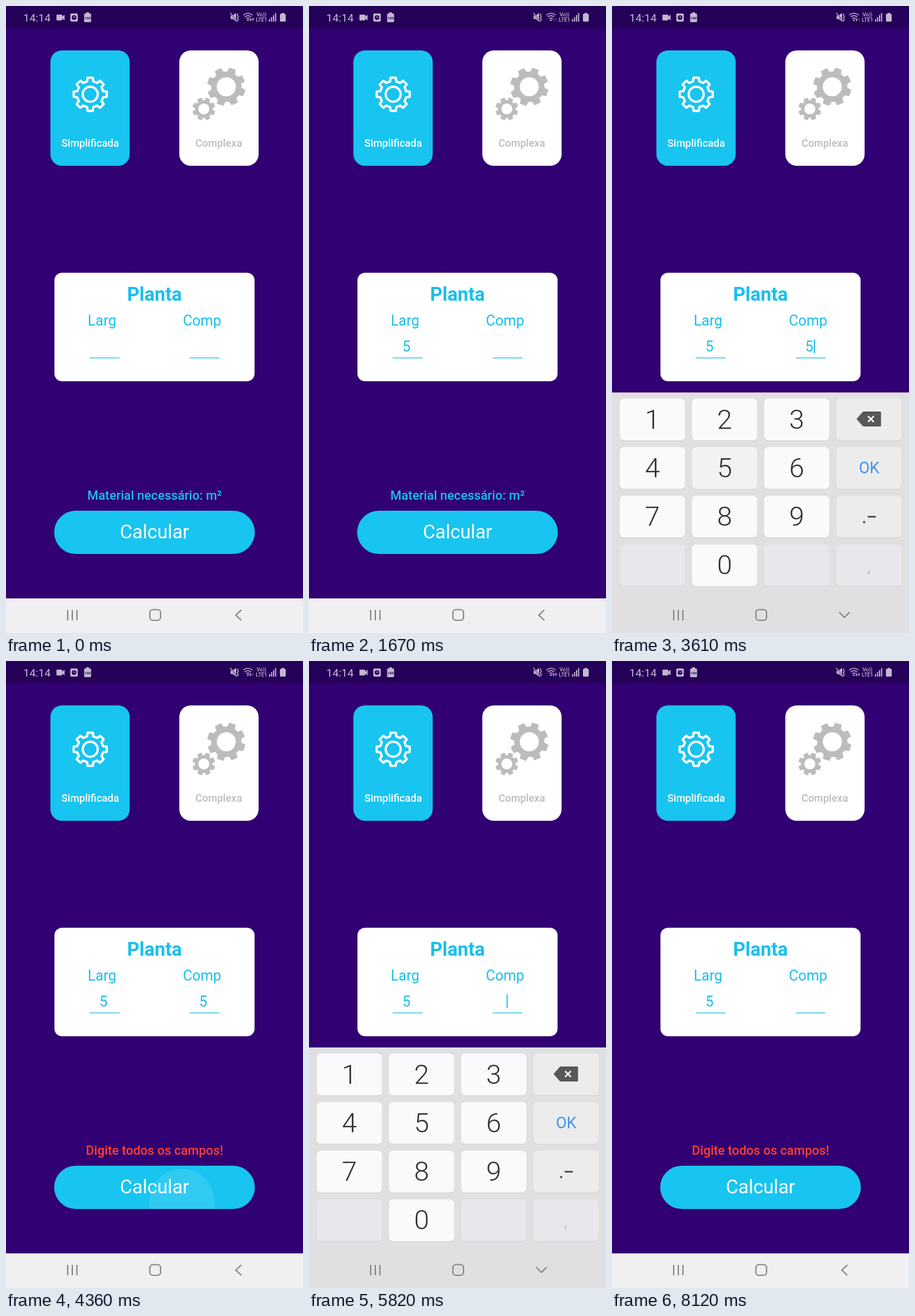
Animation, 515 px wide and 1087 px high, one loop 8180 ms. Source, as an HTML page:

```html
<!DOCTYPE html>
<html lang="pt">
<head>
<meta charset="utf-8">
<style>
  html, body { margin: 0; width: 100%; height: 100%; overflow: hidden; background: #310072; }
  svg { display: block; width: 515px; height: 1087px; font-family: Roboto, sans-serif; }
  .mid { text-anchor: middle; }
  .cyan { fill: #1abfec; }
</style>
</head>
<body>
<svg id="stage" viewBox="0 0 515 1087" xmlns="http://www.w3.org/2000/svg"></svg>
<script>
const LOOP = 8180;
const HIDE_MS = 200, SHOW_MS = 220, SLIDE = 161;

// keyboard sessions: focused field, start of show, start of hide
const sessions = [
  { field: 0, show: 420, hide: 1400 },
  { field: 1, show: 2880, hide: 3860 },
  { field: 1, show: 5240, hide: 7040 }
];
// column, row, time of key press
const presses = [
  [1, 1, 960], [3, 1, 1200],
  [1, 1, 3460], [3, 1, 3680],
  [3, 0, 5600], [3, 1, 6700]
];
// x, y, start of touch on the button
const taps = [[290, 920, 1960], [305, 937, 4290], [300, 925, 7640]];
const values = [
  [[0, ''], [1000, '5']],
  [[0, ''], [3500, '5'], [5640, '']]
];
const need = n => `Material necessário: ${n}m²`;
const warn = 'Digite todos os campos!';
const messages = [[0, need('')], [2060, warn], [4440, need('25')], [7760, warn]];
const arrows = [[0, 1, 1], [1300, 0, 0], [3600, 1, 0], [4700, 1, 1]];

const text = (x, y, size, str, attrs = '') =>
  `<text x="${x}" y="${y}" font-size="${size}" ${attrs}>${str}</text>`;
const rect = (x, y, w, h, rx, fill, attrs = '') =>
  `<rect x="${x}" y="${y}" width="${w}" height="${h}" rx="${rx}" fill="${fill}" ${attrs}/>`;

function gear(cx, cy, tip, root, turn) {
  const pts = [];
  for (let i = 0; i < 8; i++) {
    for (const [r, a] of [[root, -13.5], [tip, -9], [tip, 9], [root, 13.5]]) {
      const rad = (i * 45 + a + turn) * Math.PI / 180;
      pts.push((cx + r * Math.sin(rad)).toFixed(2) + ' ' + (cy - r * Math.cos(rad)).toFixed(2));
    }
  }
  return 'M' + pts.join('L') + 'Z';
}
const hole = (cx, cy, r) =>
  `M${cx - r} ${cy}a${r} ${r} 0 1 0 ${2 * r} 0a${r} ${r} 0 1 0 ${-2 * r} 0Z`;

const statusBar = () => rect(0, 0, 515, 39, 0, '#250058') +
  `<g fill="#c3b8d0">
    ${text(30, 26.5, 19, '14:14')}
    <path d="M88.500 15h8q1 0 1 1v2.500l4-3.500v10l-4-3.500v2.500q0 1-1 1h-8q-1 0-1-1v-8q0-1 1-1z"/>
    ${rect(111.500, 13, 13, 14, 2, '#c3b8d0')}
    <circle cx="118" cy="20" r="4" fill="#250058"/>
    <path d="M118 17.500V20H120" fill="none" stroke="#c3b8d0" stroke-width="1.200"/>
    <path d="M139 13v-2h5v2h2q1.500 0 1.500 1.500v12q0 1.500-1.500 1.500h-9q-1.500 0-1.500-1.500v-12q0-1.500 1.500-1.500z"/>
    ${text(141.500, 23, 6, '100', 'class="mid" font-weight="700" fill="#250058"')}
    <path d="M389.500 16.500h3.500l6-4.500v15l-6-4.500h-3.500z"/>
    <path d="M389 12l12 15" stroke="#250058" stroke-width="2.500"/>
    <path d="M389 12l12 15M402.500 13l-1.500 2.500 2 2.500-2 3 2 2.500-1.500 2.500" fill="none" stroke="#c3b8d0" stroke-width="1.400"/>
    <g fill="none" stroke="#c3b8d0" stroke-width="1.600">
      <path d="M411.500 16q8-7 16 0M414 19q5.500-4.500 11 0M416.500 22q3-2.500 6 0"/>
    </g>
    <circle cx="419.500" cy="24.500" r="1.500"/>
    <path id="down" d="M422 23.500h1.600v-3h1v3h1.600l-2.100 3z"/>
    <path id="up" d="M426 23.500h1.600v3h1v-3h1.600l-2.100-3z"/>
    ${text(443, 18, 9, 'Vo))', 'class="mid" font-weight="500"')}
    ${text(443, 27, 9, 'LTE1', 'class="mid" font-weight="500"')}
    ${[0, 1, 2, 3].map(i => rect(456 + i * 3.500, 23 - i * 3.600, 2, 4 + i * 3.600, 0, '#c3b8d0')).join('')}
    <path d="M478 13.500v-1.500h4v1.500h1.500q1.500 0 1.500 1.500v10.500q0 1.500-1.500 1.500h-7q-1.500 0-1.500-1.500V15q0-1.500 1.500-1.500z"/>
  </g>`;

const modeCards = () =>
  rect(77, 77, 137.5, 200, 20, '#18c4f0') +
  `<g fill="none" stroke="#fff" stroke-width="4" stroke-linejoin="round">
    <path d="${gear(146, 153, 29, 23, 0)}"/><circle cx="146" cy="153" r="13"/>
  </g>` +
  text(146, 244, 18, 'Simplificada', 'class="mid" font-weight="500" fill="#fff"') +
  rect(300.5, 77, 137.5, 200, 20, '#fff') +
  `<path fill="#bcbcbf" fill-rule="evenodd" stroke="#bcbcbf" stroke-width="2" stroke-linejoin="round"
    d="${gear(382, 140, 32.5, 25.5, 19) + hole(382, 140, 17.5)}${gear(343, 178.5, 19, 14.5, 22) + hole(343, 178.5, 10.5)}"/>` +
  text(369, 244, 18, 'Complexa', 'class="mid" font-weight="500" fill="#bcbcbf"');

const planCard = () =>
  rect(84, 462.5, 347, 188, 13, '#fff') +
  `<g class="mid cyan">
    ${text(257.5, 511, 33, 'Planta', 'font-weight="700"')}
    ${text(166.5, 554, 25, 'Larg') + text(340, 554, 25, 'Comp')}
    ${text(169, 599, 25, '', 'id="val0"') + text(342, 599, 25, '', 'id="val1"')}
    ${rect(145, 609.5, 52, 1.3, 0, '#1abfec') + rect(318.5, 609.5, 51.5, 1.3, 0, '#1abfec')}
    ${rect(0, 578, 2, 24, 0, '#1abfec', 'id="caret"')}
  </g>`;

const button = () =>
  text(257.5, 856, 22, '', 'id="msg" class="mid" font-weight="500"') +
  `<clipPath id="pill">${rect(83.5, 875, 348, 75, 37.5, '#000')}</clipPath>` +
  rect(83.5, 875, 348, 75, 37.5, '#18c4f0') +
  '<circle id="ripple" fill="#fff" clip-path="url(#pill)"/>' +
  text(257.5, 923, 33, 'Calcular', 'class="mid" fill="#fff"');

const keyX = c => 13.5 + c * 125.2;
const keyY = r => 680.5 + r * 84.3;
const digits = ['123', '456', '789', ' 0 '];

function keyboard() {
  let out = rect(0, 670, 515, 420, 0, '#e0dfe1');
  for (let r = 0; r < 4; r++) {
    for (let c = 0; c < 4; c++) {
      const x = keyX(c), y = keyY(r), d = c < 3 ? digits[r][c] : '';
      const blank = d === ' ' || (c === 3 && r === 3);
      const fill = blank ? '#e8e7eb' : c === 3 ? '#ececec' : '#faf9fb';
      out += rect(x, y + 1, 113, 72.5, 7, '#d0cfd2') + rect(x, y, 113, 72.5, 7, fill) +
        rect(x, y, 113, 72.5, 7, '#000', `id="k${c}${r}" opacity="0"`);
      if (d.trim()) out += text(x + 56.5, y + 52, 47, d, 'class="mid" font-weight="300" fill="#302f33"');
    }
  }
  return out +
    '<path d="M424 716l10.500-12q1-1 2.500-1h28q1.500 0 1.500 1.500v23q0 1.500-1.500 1.500h-28q-1.500 0-2.500-1z" fill="#58575a"/>' +
    '<path d="M444 711l10 10m0-10l-10 10" stroke="#fff" stroke-width="2.500"/>' +
    text(446, 810, 27, 'OK', 'class="mid" fill="#3f92f0"') +
    rect(435.5, 893, 3.5, 3.5, 0.5, '#48474a') + rect(443.5, 884, 14, 2.8, 0, '#48474a') +
    text(445.5, 982, 28, ',', 'class="mid" font-weight="300" fill="#aaa9ad"');
}

const navIcons = () =>
  `<g fill="none" stroke="#858488" stroke-width="2.200">
    <path d="M107 1047v18M115 1047v18M123 1047v18"/>
    <rect x="249.500" y="1046.500" width="18.500" height="18.500" rx="5"/>
    <path id="chev"/>
  </g>`;

const stage = document.getElementById('stage');
stage.innerHTML = rect(0, 0, 515, 1087, 0, '#310072') + statusBar() + modeCards() + planCard() + button() +
  rect(0, 1027, 515, 60, 0, '#f0eff2') +
  rect(0, 670, 515, 357, 0, '#faf9fb', 'id="back"') +
  `<g id="kb">${keyboard()}</g>` + navIcons();

const $ = id => document.getElementById(id);
const set = (id, attrs) => {
  const el = $(id);
  for (const k in attrs) el.setAttribute(k, attrs[k]);
};
const clamp = u => Math.max(0, Math.min(1, u));
const smooth = u => u * u * (3 - 2 * u);
const pick = (steps, t) => steps.filter(s => s[0] <= t).pop();
const show = (id, on) => set(id, { visibility: on ? 'visible' : 'hidden' });

function drawKeyboard(t) {
  const s = sessions.find(s => t >= s.show - 40 && t < s.hide + 40 + HIDE_MS);
  const focused = !!s && t < s.hide;
  let k = 0;
  if (s) {
    k = smooth(clamp((t - s.show) / SHOW_MS));
    if (!focused) k = 1 - smooth(clamp((t - s.hide - 40) / HIDE_MS));
  }
  set('kb', { opacity: k, transform: `translate(0 ${SLIDE * (1 - k)})` });
  show('back', focused);
  set('chev', { d: focused ? 'M394 1051l9 9 9-9' : 'M408 1047l-9.500 9 9.500 9' });
  for (const [c, r, at] of presses) set(`k${c}${r}`, { opacity: 0 });
  for (const [c, r, at] of presses) {
    if (t >= at && t < at + 180) set(`k${c}${r}`, { opacity: 0.1 * (1 - clamp((t - at - 90) / 90)) });
  }
  return focused ? s : null;
}

function drawFields(t, s) {
  values.forEach((steps, i) => { $('val' + i).textContent = pick(steps, t)[1]; });
  show('caret', false);
  if (!s) return;
  const [edit, value] = pick(values[s.field], t);
  const since = t - Math.max(edit, s.show - 40);
  show('caret', since % 1000 < 500);
  set('caret', { x: (s.field ? 342.5 : 169) + (value ? 7.5 : 0) });
}

function drawButton(t) {
  const msg = pick(messages, t)[1];
  $('msg').textContent = msg;
  set('msg', { fill: msg === warn ? '#ff4030' : '#1abfec' });
  const tap = taps.find(p => t >= p[2] && t < p[2] + 480);
  if (!tap) return set('ripple', { r: 0 });
  const dt = t - tap[2];
  set('ripple', {
    cx: tap[0], cy: tap[1], r: 19.6 + dt * 0.52,
    opacity: 0.11 * (1 - clamp((dt - 250) / 210))
  });
}

function draw(t) {
  const s = drawKeyboard(t);
  drawFields(t, s);
  drawButton(t);
  const [, down, up] = pick(arrows, t);
  set('down', { opacity: down ? 1 : 0.35 });
  set('up', { opacity: up ? 1 : 0.35 });
}

const start = performance.now();
function tick() {
  draw((performance.now() - start) % LOOP);
  requestAnimationFrame(tick);
}
draw(0);
requestAnimationFrame(tick);
</script>
</body>
</html>
```
